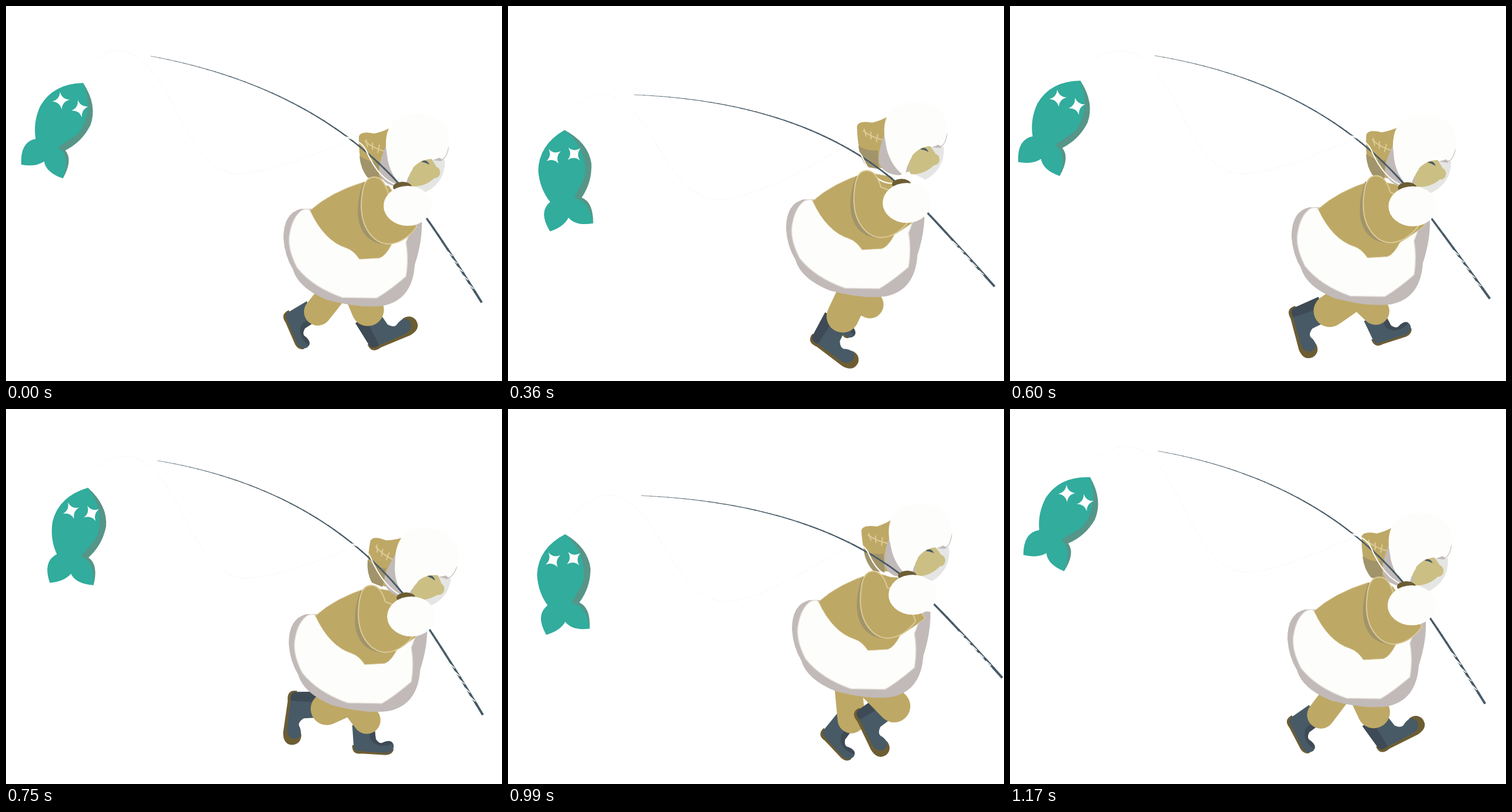
Animation, 842 px wide and 638 px high, one loop 1230 ms. Source, as an HTML page with a canvas:

```html
<!DOCTYPE html>
<html lang="en">
<head>
<meta charset="utf-8">
<title>Walking home with the catch</title>
<style>
html, body { margin: 0; width: 100%; height: 100%; overflow: hidden; background: #fff; }
canvas { display: block; }
</style>
</head>
<body>
<canvas id="stage" width="842" height="638"></canvas>
<script>
const ctx = document.getElementById('stage').getContext('2d');
const LOOP = 1230, STEP = 30;
const TIMES = [0, 180, 360, 480, 615, 750, 990, 1170];
const GOLD = '#bea865', GOLD_DARK = '#a1946a', GOLD_LIGHT = '#dccb98', BROWN = '#6d5d33',
  SLATE = '#475a66', SLATE_DARK = '#3e4a55', FUR = '#fdfdfb', GREY = '#c1bab8',
  TEAL = '#31ac9d', TEAL_DARK = '#569587', SKIN = '#cbbf84';

// One row per entry of TIMES; angles in degrees.
const tracks = {
  body: [[0, 0], [-1, 9], [1, -16], [6, -18], [7, -1], [9, 4], [11, -20], [0, -4]],
  head: [[0, 0, 0], [2, 7, 3.5], [-6, -21, -2], [-3, -14, 0], [6, 3, 3], [15, 19, 10], [2, -23, -4.5], [-2, -7, -1.3]],
  sleeve: [[625, 291], [612, 304], [609, 280], [614, 280], [622, 290], [620, 300], [620, 276], [627, 286]],
  hand: [[682, 340], [677, 356], [677, 335], [679, 332], [684, 342], [688, 353], [687, 316], [682, 334]],
  // tip x, tip y, bend y, butt x, butt y
  rod: [[188, 76, 121, 806, 502], [171, 122, 142, 810, 510], [153, 150, 148, 824, 475], [160, 138, 142, 822, 477],
    [190, 72, 112, 812, 498], [200, 80, 116, 808, 518], [165, 146, 147, 837, 455], [194, 63, 103, 805, 499]],
  fish: [[131, 131, 24.5], [111, 180, 0], [96, 211, -4.5], [97, 199, 10.3], [122, 122, 25], [139, 134, 9.2], [97, 213, -2], [136, 116, 28]],
  nearBoot: [[622, 583, -28], [574, 595, 3], [515, 568, 32], [488, 533, 54], [476, 515, 72], [484, 483, 93], [590, 517, 59], [630, 581, -32]],
  farBoot: [[473, 526, 63], [507, 520, 82], [558, 502, 75], [589, 543, 40], [622, 578, -25], [592, 582, 0], [532, 553, 43], [472, 530, 59]]
};

// Periodic cubic interpolation through the keys.
function sample(rows, ms) {
  const n = TIMES.length;
  let i = n - 1;
  while (TIMES[i] > ms) i--;
  const time = k => TIMES[(k + n) % n] + LOOP * Math.floor(k / n);
  const row = k => rows[(k + n) % n];
  const span = time(i + 1) - time(i), u = (ms - time(i)) / span;
  return row(i).map((a, c) => {
    const b = row(i + 1)[c];
    const m0 = (b - row(i - 1)[c]) / (time(i + 1) - time(i - 1)) * span;
    const m1 = (row(i + 2)[c] - a) / (time(i + 2) - time(i)) * span;
    return a + u * (m0 + u * (3 * (b - a) - 2 * m0 - m1 + u * (2 * (a - b) + m0 + m1)));
  });
}

function shape(d, fill, stroke, width = 1.5) {
  const p = new Path2D(d);
  if (fill) { ctx.fillStyle = fill; ctx.fill(p); }
  if (stroke) { ctx.strokeStyle = stroke; ctx.lineWidth = width; ctx.stroke(p); }
}

function ellipse(x, y, rx, ry, fill) {
  ctx.beginPath();
  ctx.ellipse(x, y, rx, ry, 0, 0, 7);
  ctx.fillStyle = fill;
  ctx.fill();
}

function at(x, y, deg, scale, draw) {
  ctx.save();
  ctx.translate(x, y);
  ctx.rotate(deg * Math.PI / 180);
  ctx.scale(scale, scale);
  draw();
  ctx.restore();
}

function star(x, y, deg) {
  at(x, y, deg, 1, () => shape('M-15 0Q-2 -2 0 -15Q2 -2 15 0Q2 2 0 15Q-2 2 -15 0Z', '#fff'));
}

function drawFish([x, y, deg]) {
  at(x, y, deg, 1, () => {
    shape('M0 0Q38 24 41 60Q40 92 20 117Q39 126 36 162L5 125L0 90Z', TEAL_DARK);
    shape('M0 0Q30 28 30 66Q30 76 27 84L7 117Q32 122 36 162Q6 165 -5 149Q-14 164 -38 170Q-56 136 -34 120Q-50 96 -50 66Q-46 22 0 0Z', TEAL);
    star(-22, 43, -30);
    star(13, 42, -38);
  });
}

function drawLeg([x, y, deg], hipX, hipY, near) {
  const scale = near ? 1 : .85, a = deg * Math.PI / 180;
  at(x, y, deg, scale, () => {
    if (near) shape('M-4 -10Q-6 8 14 5L68 10Q90 9 88 -9Q84 -22 70 -21L40 -8Z', BROWN);
    else shape('M-5 -12Q-6 8 14 5L62 8Q76 7 78 -4L40 -8Z', BROWN);
    shape('M-5 -52H39L42 -24Q50 -12 58 -18Q76 -25 78 -10Q77 3 62 4L10 0Q-1 0 -2 -8Z', SLATE);
    shape(near ? 'M-5 -52H14L13 0Q-2 2 -2 -8Z'
      : 'M39 -52L42 -24Q50 -12 58 -18Q72 -22 76 -15Q45 -2 31 -24L28 -52Z', SLATE_DARK);
  });
  const kx = 24 * scale, ky = -62 * scale;
  ctx.lineCap = 'round';
  shape(`M${hipX} ${hipY}L${x + kx * Math.cos(a) - ky * Math.sin(a)} ${y + kx * Math.sin(a) + ky * Math.cos(a)}`,
    null, GOLD, 55 * scale);
  ctx.lineCap = 'butt';
}

function drawCoat([x, y]) {
  at(x, y, 0, 1, () => {
    shape('M501 345Q471 352 471 395Q473 425 487 448Q496 480 545 500Q600 515 640 510Q690 500 694 440Q707 400 706 365L660 360L520 345Z', GREY);
    shape('M503 347Q514 343 516 348L690 370Q684 390 679 402Q684 430 679 460Q650 485 629 497L571 496Q520 478 494 445Q476 410 482 385Q487 358 503 347Z', FUR, '#e0dcd6');
    shape('M516 348Q550 317 608 299L650 306L697 376Q680 390 655 405Q645 425 634 429L600 431Q590 416 578 412Q540 400 516 348Z', GOLD, '#e6dcbd', 1);
  });
}

function drawHead([x, y, deg]) {
  at(699 + x, 240 + y, deg, 1, () => {
    ctx.translate(-699, -240);
    shape('M745 262Q746 300 712 317L690 305L700 262Z', '#e5e5e4');
    shape('M599 222Q602 212 625 217Q640 214 657 205L648 250L640 295L612 290Q598 265 599 222Z', GOLD);
    shape('M600 255Q615 266 633 264L633 296L614 292Q602 278 600 255Z', GOLD_DARK);
    shape('M609 230Q625 243 645 248M611 227L614 240M622 232L622 245M634 236L631 250', null, GOLD_LIGHT, 2);
    shape('M650 228Q632 262 634 285Q640 305 668 308L690 300Z', GREY);
    shape('M688 275Q700 262 722 260L730 272L728 292Q712 308 688 307Q680 298 688 275Z', SKIN);
    ellipse(728, 283, 9, 10, SKIN);
    shape('M724 262Q745 258 752 238Q750 258 738 264Z', GREY);
    shape('M705 265Q714 259 719 270Q712 266 705 265Z', SLATE);
    shape('M645 240Q642 184 700 184Q752 188 752 230Q750 256 740 261Q728 252 715 258Q690 272 690 278Q676 300 680 312Q655 295 648 262Z', FUR);
  });
}

function quad(a, b, c, t) {
  const s = 1 - t;
  return [0, 1].map(i => s * s * a[i] + 2 * s * t * b[i] + t * t * c[i]);
}

function drawRod([tx, ty, bendY, bx, by], [hx, hy], [nx, ny]) {
  const tip = [tx, ty], grip = [hx + 7, hy - 12], butt = [bx, by];
  const bend = [tx + .665 * (grip[0] - tx), bendY];
  const lower = [0, 1].map(i => grip[i] + .22 * (grip[i] - bend[i]));
  const point = t => t < .75 ? quad(tip, bend, grip, t / .75) : quad(grip, lower, butt, t * 4 - 3);

  ctx.strokeStyle = SLATE;
  const N = 60;
  for (let i = 4; i < N; i++) {
    ctx.beginPath();
    ctx.moveTo(...point(i / N));
    ctx.lineTo(...point((i + 1.15) / N));
    ctx.lineWidth = .4 + 3.6 * i / N;
    ctx.stroke();
  }

  // Slack line: faint in the open, white over the hood.
  const [cx, cy] = point(.575), lowX = tx + 208, lowY = 240 + .6 * ty;
  ctx.setLineDash([2, 4]);
  shape(`M${nx + 16} ${ny - 36}Q${tx - 15} ${ty} ${tx} ${ty}C${tx + 95} ${ty} ${lowX - 100} ${lowY} ${lowX} ${lowY}` +
    `Q${lowX + 65} ${lowY - 4} ${cx - 15} ${cy - 14}`, null, '#e4e4e4', .7);
  ctx.setLineDash([]);
  shape(`M${cx - 28} ${cy - 18}Q${cx + 2} ${cy - 12} ${cx + 10} ${cy + 6}Q${cx + 32} ${cy + 58} ${grip[0] - 20} ${grip[1] - 22}`,
    null, FUR, 2);
  for (let i = 0; i < 5; i++) {
    const [x, y] = point(.91 + i * .016);
    shape(`M${x - 5} ${y - 3}L${x + 4} ${y + 5}`, null, '#fff', 1.5);
  }
}

function drawArm([sx, sy], [hx, hy]) {
  ellipse(hx - 9, hy - 32, 16, 9, BROWN);
  at(sx, sy, 0, 1, () => {
    shape('M-18 9Q-32 45 -26 76Q-16 116 28 115L10 60Z', GOLD_DARK);
    shape('M24 28Q16 0 0 0Q-16 0 -20 26Q-26 64 -13 88Q2 114 25 114Q52 112 72 85L55 40Z', GOLD, GOLD_LIGHT, 2);
  });
  ellipse(hx, hy, 41, 34, FUR);
}

function render(now) {
  const ms = Math.min(1170, Math.floor(now % LOOP / STEP) * STEP);
  const pose = {};
  for (const name in tracks) pose[name] = sample(tracks[name], ms);
  const [x, y] = pose.body;

  ctx.clearRect(0, 0, 842, 638);
  drawFish(pose.fish);
  drawLeg(pose.farBoot, x + 565, y + 475, false);
  drawLeg(pose.nearBoot, x + 598, y + 478, true);
  drawCoat(pose.body);
  drawHead(pose.head);
  drawRod(pose.rod, pose.hand, pose.fish);
  drawArm(pose.sleeve, pose.hand);
}

const start = performance.now();
function tick() {
  render(performance.now() - start);
  requestAnimationFrame(tick);
}
tick();
</script>
</body>
</html>
```
